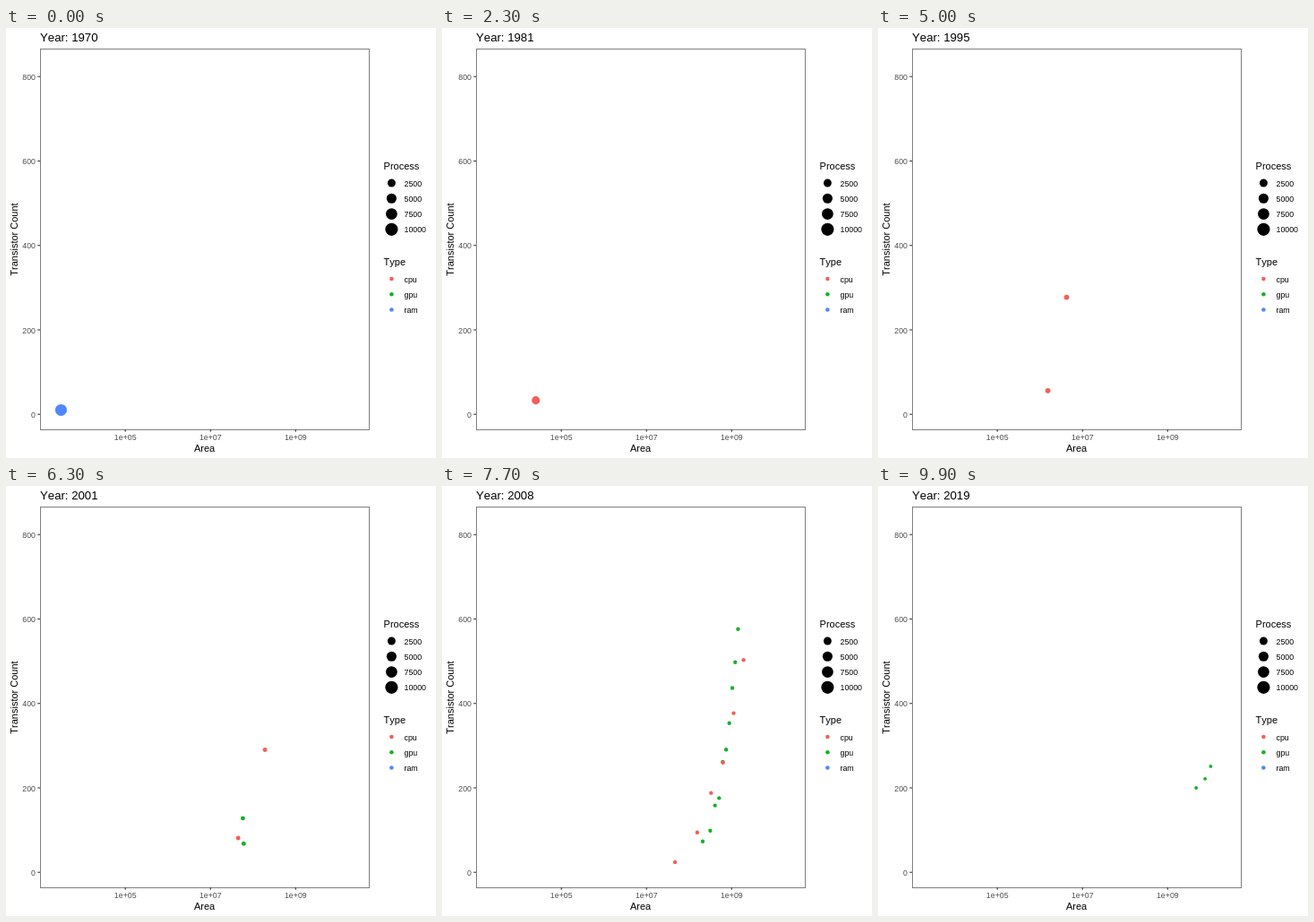
Animation, 480 px wide and 480 px high, one loop 10 s. Source, as an HTML page with a canvas:

```html
<!DOCTYPE html>
<html lang="en">
<head>
<meta charset="utf-8">
<title>Transistor counts by year</title>
<style>
  html, body { margin: 0; width: 100%; height: 100%; overflow: hidden; background: #fff; }
  canvas { display: block; }
</style>
</head>
<body>
<canvas id="stage" width="480" height="480"></canvas>
<script>
const ctx = document.getElementById('stage').getContext('2d');
const FONT = '"Liberation Sans", Arial, sans-serif';
const FIRST = 1970, LAST = 2019, FRAMES = 100, FRAME_MS = 100;

// Trend keys: [year, chips, log10 count and area of the smallest chip, same of the largest].
// Years between two keys are interpolated unless the series is sparse.
const series = [
  {
    name: 'gpu', color: '#17b12b', seed: 5, gaps: [],
    process: year => 10000 * 2 ** ((1972 - year) / 5),
    keys: [
      [1996, 1, 6.41, 81, 6.41, 81],
      [1999, 4, 6.9, 70, 7.63, 279],
      [2001, 2, 7.76, 128, 7.78, 68],
      [2008, 10, 8.32, 73, 9.15, 576],
      [2013, 3, 9.02, 90, 9.8, 438],
      [2018, 4, 10.03, 445, 10.27, 754],
      [2019, 3, 9.67, 200, 10.01, 251]
    ]
  },
  {
    name: 'cpu', color: '#f35e5a', seed: 2, gaps: [1977, 1980],
    process: year => Math.min(10000, 10000 * 2 ** ((1972 - year) / 5)),
    keys: [
      [1971, 1, 3.35, 12, 3.35, 12],
      [1974, 4, 3.48, 12, 3.9, 11],
      [1979, 2, 4.46, 33, 4.83, 44],
      [1981, 1, 4.06, 6, 4.06, 6],
      [1982, 2, 4.74, 60, 5.13, 49],
      [1987, 1, 5.44, 102, 5.44, 102],
      [1994, 2, 5.76, 68, 6.4, 218],
      [1995, 2, 6.4, 50, 6.74, 307],
      [2001, 2, 7.65, 81, 8.28, 290],
      [2008, 6, 7.67, 24, 9.28, 503],
      [2013, 4, 9, 102, 9.62, 650],
      [2018, 6, 9.82, 74, 10.37, 825]
    ]
  },
  {
    name: 'ram', color: '#5086ff', seed: 1, gaps: [], sparse: true,
    process: year => 8000 * 2 ** ((1970 - year) / 4),
    keys: [
      [1970, 1, 3.49, 10, 3.49, 10],
      [1980, 2, 5.42, 34, 5.42, 42],
      [1987, 1, 7.22, 148, 7.22, 148]
    ]
  }
];

const noise = n => {
  const v = Math.sin(n * 12.9898) * 43758.5453;
  return v - Math.floor(v);
};
const lerp = (a, b, k) => a + (b - a) * k;
const xAt = log10 => 133.2 + (log10 - 5) * 47.53;
const yAt = area => 431.2 - area * 0.4712;
const radius = process =>
  1.77 + 5.33 * Math.sqrt(Math.max(0, process - 7) / 9993);
const frameOf = year => Math.round((year - FIRST) * (FRAMES - 1) / (LAST - FIRST));

function trendAt({ keys, gaps, sparse }, year) {
  const next = keys.findIndex(key => key[0] >= year);
  if (next < 0 || gaps.includes(year)) return null;
  const b = keys[next];
  if (b[0] === year) return b;
  if (next === 0 || sparse) return null;
  const a = keys[next - 1];
  const k = (year - a[0]) / (b[0] - a[0]);
  return a.map((value, i) => lerp(value, b[i], k));
}

// Area grows faster than the logarithm of the count; chips in the middle scatter a little.
function pointsFor(s, year) {
  const trend = trendAt(s, year);
  if (!trend) return [];
  const [, chips, logLow, areaLow, logHigh, areaHigh] = trend;
  const count = Math.round(chips);
  return Array.from({ length: count }, (_, i) => {
    const u = count > 1 ? i / (count - 1) : 0;
    const scatter = 0.6 * u * (1 - u) * (noise(year * 31 + i * 7 + s.seed) - 0.5);
    return {
      x: xAt(lerp(logLow, logHigh, u ** 0.7)),
      y: yAt(lerp(areaLow, areaHigh, u ** 1.3 + scatter)),
      r: radius(s.process(year))
    };
  });
}

const states = [];
for (let year = FIRST; year <= LAST; year++) {
  const groups = series.map(s => pointsFor(s, year));
  if (groups.some(g => g.length)) states.push({ frame: frameOf(year), groups });
}

function dot(x, y, r, color) {
  ctx.fillStyle = color;
  ctx.beginPath();
  ctx.arc(x, y, r, 0, 2 * Math.PI);
  ctx.fill();
}

function text(str, x, y, size, color = '#000', align = 'left') {
  ctx.font = `${size}px ${FONT}`;
  ctx.fontKerning = 'none';
  ctx.fillStyle = color;
  ctx.textAlign = align;
  ctx.fillText(str, x, y);
}

function line(x1, y1, x2, y2) {
  ctx.beginPath();
  ctx.moveTo(x1, y1);
  ctx.lineTo(x2, y2);
  ctx.stroke();
}

function drawAxes() {
  ctx.lineWidth = 1;
  ctx.strokeStyle = '#7f7f7f';
  ctx.strokeRect(38.5, 23.5, 367, 425);
  ctx.lineWidth = 1.07;
  ctx.strokeStyle = '#333';
  for (let v = 0; v <= 800; v += 200) {
    const y = yAt(v);
    line(35.3, y, 38, y);
    text(v, 33, y + 3.6, 8.8, '#4d4d4d', 'right');
  }
  for (const e of [5, 7, 9]) {
    const x = xAt(e);
    line(x, 448, x, 450.8);
    text(`1e+0${e}`, x, 460, 8.8, '#4d4d4d', 'center');
  }
  text('Area', 221.5, 473, 11, '#000', 'center');
  ctx.save();
  ctx.translate(13.2, 236);
  ctx.rotate(-Math.PI / 2);
  text('Transistor Count', 0, 0, 11, '#000', 'center');
  ctx.restore();
}

function drawLegend(title, titleY, items) {
  text(title, 421.6, titleY, 11);
  items.forEach(({ label, r, color }, i) => {
    const y = titleY + 15 + i * 17.28;
    dot(430.4, y, r, color);
    text(label, 444.5, y + 3.6, 8.8);
  });
}

function drawLegends() {
  drawLegend('Process', 158, [2500, 5000, 7500, 10000].map(
    p => ({ label: p, r: radius(p), color: '#000' })));
  drawLegend('Type', 265, ['cpu', 'gpu', 'ram'].map(
    label => ({ label, r: 2.3, color: series.find(s => s.name === label).color })));
}

// Chips pair up by order within a series; unpaired ones hold until the next year.
function drawPoints(frame) {
  let i = states.length - 1;
  while (states[i].frame > frame) i--;
  const from = states[i], to = states[i + 1] || from;
  const k = to === from ? 0 : (frame - from.frame) / (to.frame - from.frame);
  from.groups.forEach((group, g) => group.forEach((a, j) => {
    const b = to.groups[g][j] || a;
    dot(lerp(a.x, b.x, k), lerp(a.y, b.y, k), lerp(a.r, b.r, k), series[g].color);
  }));
}

function draw(now) {
  const frame = Math.floor(now / FRAME_MS) % FRAMES;
  ctx.fillStyle = '#fff';
  ctx.fillRect(0, 0, 480, 480);
  const year = Math.round(lerp(FIRST, LAST, frame / (FRAMES - 1)));
  text(`Year: ${year}`, 38, 15, 13.2);
  drawAxes();
  drawPoints(frame);
  drawLegends();
}

const start = performance.now();
function tick() {
  draw(performance.now() - start);
  requestAnimationFrame(tick);
}
tick();
</script>
</body>
</html>
```
